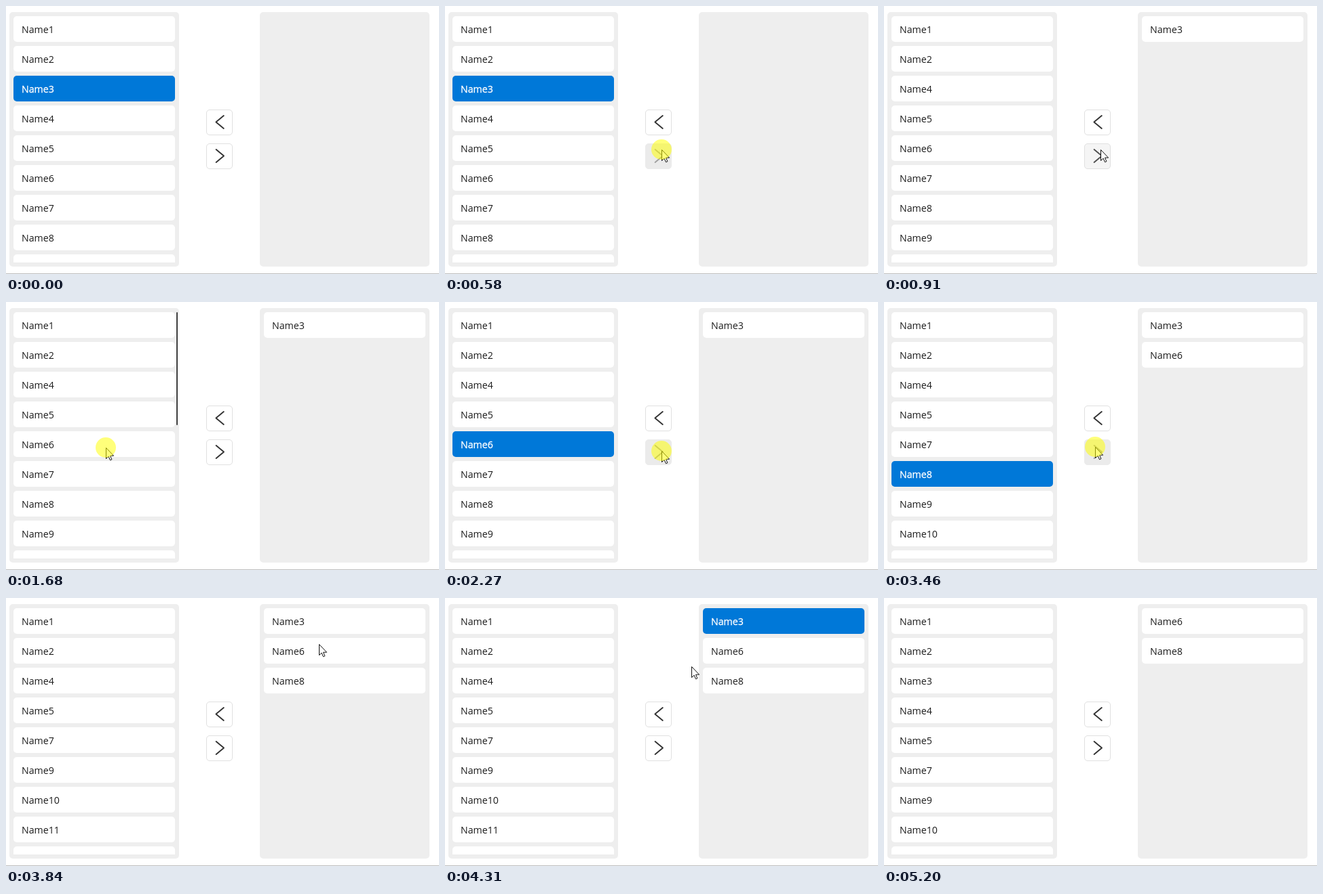
An HTML page for the animation above (5450 ms loop, 638x396 px).

```html
<!DOCTYPE html>
<html lang="en">
<head>
<meta charset="utf-8">
<title>Move items between lists</title>
<style>
  html, body { margin: 0; width: 100%; height: 100%; overflow: hidden; background: #fff; }
  svg { display: block; width: 638px; height: 396px; }
  text { font: 14.2px "Open Sans", "Noto Sans", sans-serif; fill: #1b1b1b; }
  .panel { fill: #eee; }
  .row rect { fill: #fff; }
  .row.on rect { fill: #0078d8; }
  .row.on text { fill: #fff; stroke: #fff; stroke-width: .3; }
  .btn rect { fill: #fff; stroke: #e0e0e0; }
  .btn path { fill: none; stroke: #333; stroke-width: 1.9; stroke-linecap: round; stroke-linejoin: round; }
  .btn.hover rect { fill: #f5f5f5; }
  .btn.hover path { stroke: #505050; }
  .btn.down rect { fill: #ebebeb; stroke: #ebebeb; }
  .btn.down path { stroke: #a0a0a0; }
</style>
</head>
<body>
<svg viewBox="0 0 638 396">
  <clipPath id="view"><rect y="15" width="638" height="364"/></clipPath>
  <rect class="panel" x="5" y="9" width="250" height="376" rx="5"/>
  <rect class="panel" x="374" y="9" width="250" height="376" rx="5"/>
  <rect y="395" width="638" height="1" fill="#bdbdbd"/>
  <g id="rows" clip-path="url(#view)"></g>
  <rect id="bar" x="251" y="15" width="2" height="167" rx="1" fill="#444"/>
  <g class="btn"><rect x="295.5" y="153.5" width="38" height="37" rx="4.5"/><path d="M320.8 162L309.4 171.5L320.8 181"/></g>
  <g class="btn"><rect x="295.5" y="203.5" width="38" height="37" rx="4.5"/><path d="M309.6 212L321 221.5L309.6 231"/></g>
  <g id="cursor">
    <path d="M.5 .5V16.5L4.1 13.1L6.5 18.7L8.9 17.7L6.5 12.2H11.6Z" fill="#fff" stroke="#111"/>
    <circle id="ring" r="15" fill="#ff0" fill-opacity=".52"/>
  </g>
</svg>
<script>
const LOOP = 5450, TICK = 65, LAST = 80;
const ROW_TOP = 15, PITCH = 44;

// The pointer enters, clicks each spot (released at tick `at`) and leaves.
const enter = { at: 0, x: 572, y: 378 };
const clicks = [
  { at: 9, x: 319, y: 212 },
  { at: 27, x: 147, y: 215 },
  { at: 35, x: 319, y: 220 },
  { at: 42, x: 195, y: 251 },
  { at: 53, x: 311, y: 214 },
  { at: 63, x: 465, y: 42 },
  { at: 72, x: 320, y: 171 }
];
const exit = { at: LAST + 1, x: 560, y: 364 };
const stops = [enter, ...clicks, exit];

const $ = id => document.getElementById(id);
const buttons = [...document.querySelectorAll('.btn')];
const show = (el, on) => el.setAttribute('visibility', on ? 'inherit' : 'hidden');
const easeOut = (f, power) => 1 - (1 - f) ** power;
const leftOf = right => Array.from({ length: 12 }, (_, i) => i + 1).filter(n => !right.includes(n));

// A click on a row selects it; a click on a button moves the selected item.
function applyClick({ right, selected }, { x, y }) {
  const row = Math.floor((y - ROW_TOP) / PITCH);
  if (x < 255) return { right, selected: leftOf(right)[row] };
  if (x > 374) return { right, selected: right[row] };
  const rest = right.filter(n => n !== selected);
  return { right: y > 197 ? [...rest, selected] : rest, selected: 0 };
}

function pointerAt(k) {
  const i = stops.findIndex(s => s.at >= k);
  const a = stops[i - 1], b = stops[i];
  const from = Math.max(a.at + 1, b.at - 13), to = b.at - 2;
  const f = Math.min(1, Math.max(0, (k - from) / (to - from)));
  return [a.x + (b.x - a.x) * easeOut(f, 3), a.y + (b.y - a.y) * easeOut(f, 1.5)];
}

function rows(items, x, selected) {
  return items.map((n, i) => {
    const y = ROW_TOP + i * PITCH;
    return `<g class="row${n === selected ? ' on' : ''}">
      <rect x="${x}" y="${y}" width="238" height="38" rx="5"/>
      <text x="${x + 12}" y="${y + 25}">Name${n}</text></g>`;
  }).join('');
}

function render(k) {
  const { right, selected } = clicks.filter(c => c.at < k).reduce(applyClick, { right: [], selected: 3 });
  $('rows').innerHTML = rows(leftOf(right).slice(0, 9), 11, selected) + rows(right, 380, selected);

  const visible = k > 0 && k < LAST;
  const [x, y] = visible ? pointerAt(k) : [-99, -99];
  const down = clicks.some(c => k <= c.at && k > c.at - 3);
  $('cursor').setAttribute('transform', `translate(${Math.round(x)} ${Math.round(y)})`);
  show($('cursor'), visible);
  show($('ring'), down);
  show($('bar'), x > 5 && x < 255);
  buttons.forEach((btn, i) => {
    const top = 153 + i * 50;
    const over = x > 295 && x < 334 && y > top && y < top + 38;
    btn.classList.toggle('hover', over);
    btn.classList.toggle('down', over && down);
  });
}

let start, drawn;
function frame(now) {
  start ??= now;
  const time = (now - start) % LOOP;
  const k = Math.min(LAST, Math.floor((time + 5) / TICK));
  if (k !== drawn) render(drawn = k);
  requestAnimationFrame(frame);
}
render(0);
requestAnimationFrame(frame);
</script>
</body>
</html>
```
